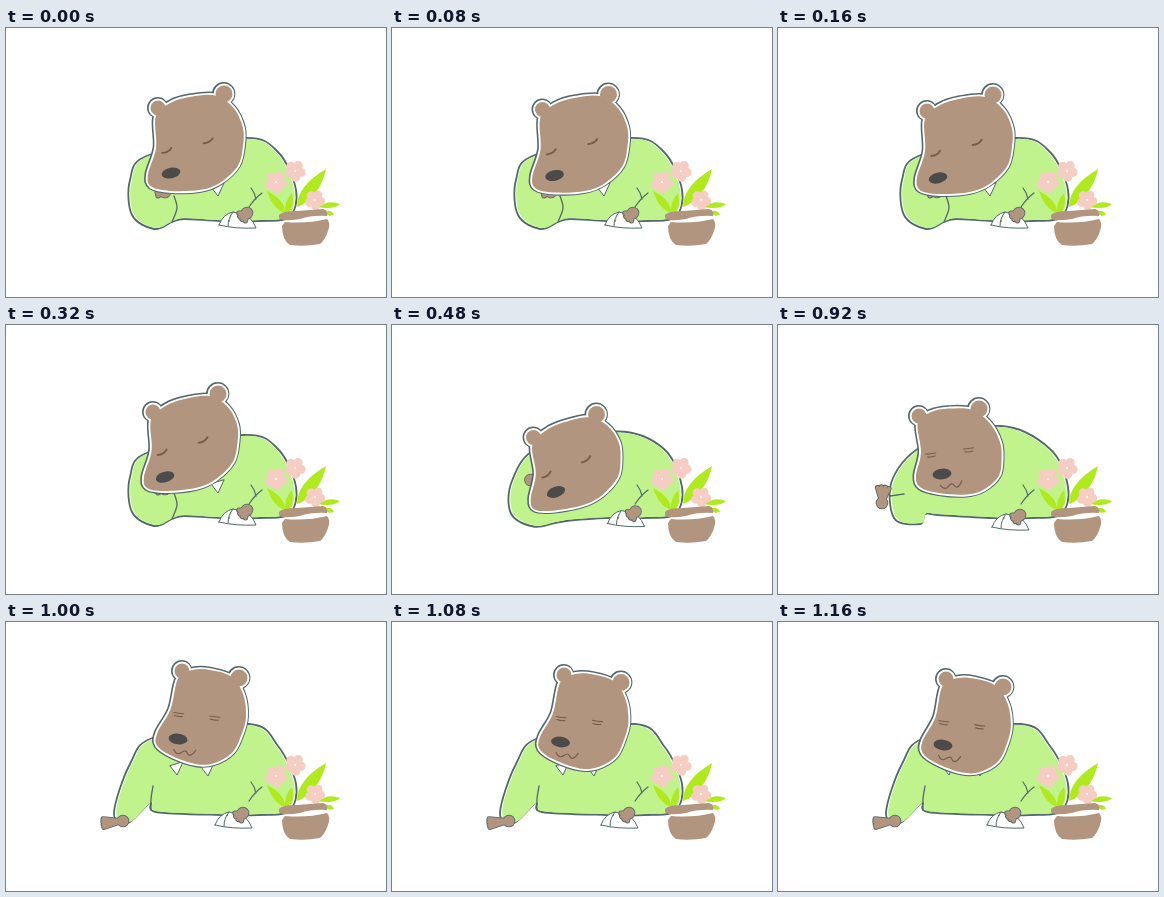
Write an HTML page that moves like this. It is 380 px wide and 269 px high and loops after 1.96 s.

```html
<!DOCTYPE html>
<html lang="en">
<head>
<meta charset="utf-8">
<title>Dozing bear</title>
<style>
  html, body { margin: 0; width: 100%; height: 100%; overflow: hidden; background: #fff; }
  svg { display: block; width: 100vw; height: 100vh; }
  path { stroke-linecap: round; stroke-linejoin: round; }
</style>
</head>
<body>
<svg id="stage" viewBox="0 0 380 269"></svg>
<script>
const INK = '#52686a', BROWN = '#b2957e', GREEN = '#c0f38c', PINK = '#f6cdc2',
      LEAF = '#aeea1c', FACE = '#795d4c', NOSE = '#4c4b4a';
const LOOP = 1960;
const stage = document.getElementById('stage');

const nums = text => text.split(' ').map(Number);
const pairs = list => list.flatMap((v, i) => i % 2 ? [] : [[v, list[i + 1]]]);

// The back and seat stay put; only the left arm and the neck move.
const BACK = nums('272 124 290 162 283 189 252 193 215 193');

// arm: outline from the seat round the left arm to the neck.
// left: palm x, y, direction, finger length, spread between fingers.
const asleep = {
  arm: nums('178 191 166 194 148 201 126 187 124 152 143 127 238 110'),
  fold: nums('168 168 171 180 166 194'), left: [159, 164, 185, 8, 22],
  right: [241, 185], collar: [[212, 168]]
};
const fallen = {
  arm: nums('178 200 160 202 135 202 112 190 116 160 150 118 215 103'),
  fold: nums('137 130 157 113 182 104'), left: [118, 146, -122, 19, 22],
  right: [246, 188], collar: [], squint: true, wand: true
};
const waking = {
  arm: nums('160 190 147 189 142 199 116 193 115 153 150 118 223 101'),
  fold: nums('112 171 119 170 126 169'), left: [104, 178, -85, 16, 14],
  right: [242, 190], collar: [], squint: true, mouth: true
};
const upright = {
  arm: nums('150 190 144 181 122 201 108 191 124 142 149 115 243 102'),
  fold: nums('147 164 145 177 145 188'), left: [117, 199, 174, 20, 8],
  right: [237, 191], collar: [[171, 153], [202, 154]], squint: true, mouth: true
};

// The head hangs on its two ears and the chin.
const pose = (body, earL, earR, chin, nose) => ({ body, earL, earR, chin, nose });
const poses = [
  pose(asleep, [152, 80], [218, 66], [165, 163], [165, 145]),
  pose(asleep, [149, 83], [215, 67], [162, 166], [160, 150]),
  pose(asleep, [147, 87], [212, 69], [161, 166], [159, 152]),
  pose(fallen, [136, 138], [197, 110], [165, 205], [169, 182]),
  pose(waking, [141, 91], [201, 84], [161, 168], [164, 149]),
  pose(upright, [176, 49], [233, 56], [166, 134], [172, 117]),
  pose(upright, [168, 57], [225, 65], [160, 142], [165, 123])
];

// Head outline: along the ears (0 to 1) and down to the chin (0 to 1).
const SKULL = pairs(nums('-.05 .09 .2 -.03 .51 -.05 .88 0 1.11 .19 1.2 .44 1.16 .65 ' +
  '1.04 .87 .75 1.02 .44 1.06 0 1 -.28 .9 -.3 .75 -.12 .46'));
const EYES = [[.03, .51], [.66, .5]];

// Start time and place in the pose sequence; halves are blends.
const steps = [[0, 0], [80, .5], [160, 1], [240, 1.5], [320, 2], [480, 2.5],
               [560, 3], [920, 4], [1000, 5], [1080, 5.5], [1160, 6]];

function mix(a, b, t) {
  if (typeof a === 'number') return a + (b - a) * t;
  if (Array.isArray(a)) return a.length === b.length ? a.map((v, i) => mix(v, b[i], t)) : a;
  if (typeof a === 'object')
    return Object.fromEntries(Object.keys(a).map(key => [key, mix(a[key], b[key], t)]));
  return a;
}

// Smooth curve through all points.
function curve(pts, closed) {
  const n = pts.length;
  const at = i => closed ? pts[(i + n) % n] : pts[Math.max(0, Math.min(n - 1, i))];
  let d = 'M' + pts[0];
  for (let i = 0; i < (closed ? n : n - 1); i++) {
    const [p, a, b, q] = [at(i - 1), at(i), at(i + 1), at(i + 2)];
    const c1 = a.map((v, k) => v + (b[k] - p[k]) / 6);
    const c2 = b.map((v, k) => v - (q[k] - a[k]) / 6);
    d += `C${c1} ${c2} ${b}`;
  }
  return d + (closed ? 'Z' : '');
}

const polar = (x, y, degrees, r) =>
  [x + r * Math.cos(degrees * Math.PI / 180), y + r * Math.sin(degrees * Math.PI / 180)];
const circle = ([x, y], r) => `M${x - r} ${y}a${r} ${r} 0 1 1 ${2 * r} 0a${r} ${r} 0 1 1 ${-2 * r} 0Z`;
const path = (d, fill, stroke = 'none', width = 0, extra = '') =>
  `<path d="${d}" fill="${fill}" stroke="${stroke}" stroke-width="${width}" ${extra}/>`;
const line = (d, color, width) => path(d, 'none', color, width);

function paw(x, y, direction, length, spread) {
  const palm = circle([x, y], 5.5);
  const fingers = [-1.5, -.5, .5, 1.5].map(k =>
    `M${x} ${y}L${polar(x, y, direction + k * spread, length)}`).join('');
  return line(fingers, INK, 5.4) + path(palm, BROWN, INK, 1.6) +
    line(fingers, BROWN, 3.6) + path(palm, BROWN);
}

function sheet([x, y]) {
  const at = `transform="translate(${x - 28} ${y + 12})"`;
  return path('M0 0Q4 -11 14 -13L29 -9Q35 -3 37 3Q16 4 0 0Z M14 -13Q9 -7 9 1', '#fff', INK, 1, at);
}

function wand() {
  const star = Array.from({ length: 10 }, (_, i) => polar(57, 134, i * 36 - 98, i % 2 ? 5.5 : 11));
  return path(`M${star.join('L')}Z`, '#f6f48e', '#eef0a0', 2) + line('M67 152L74 161', '#b5dcb0', 1.5);
}

function flower(x, y, size) {
  let d = circle([x, y], size * .7);
  for (let i = 0; i < 5; i++) d += circle(polar(x, y, i * 72 - 60, size * 1.35), size);
  return path(d, PINK) + path(circle([x, y], 1.2), '#fff3e8');
}

const plant =
  path('M291 179Q291 158 320 141Q315 165 296 177Z M261 163Q267 181 279 185Q279 172 261 163Z' +
       'M279 186Q278 173 286 165Q289 178 283 185Z M311 180Q322 171 334 176Q328 182 311 179Z', LEAF) +
  flower(270, 154, 4.8) + flower(289, 143, 4.6) + flower(309, 172, 4.4) +
  path('M273 187Q276 183 291 183L317 181Q324 183 321 188Q306 187 294 191Q276 194 273 190Z' +
       'M279 194Q301 196 321 191Q325 195 322 203Q319 212 314 216Q298 219 284 217Q276 212 276 198Z', BROWN) +
  path('M320 183Q326 182 328 187L323 188Z', LEAF);

function torso({ arm, fold, collar }) {
  const outline = curve(pairs([...arm, ...BACK]), true);
  return path(outline, '#fff', INK, 1.8) +
    path(outline, GREEN, 'none', 0, 'transform="translate(205 155) scale(.978) translate(-205 -155)"') +
    line(curve(pairs(fold)), INK, 1.3) +
    line('M245 160Q249 165 250 171M256 165Q249 170 243 179', INK, 1.2) +
    collar.map(([x, y]) => path(`M${x - 7} ${y - 9}L${x} ${y}L${x + 6} ${y - 13}Z`, '#fff', INK, 1)).join('');
}

function head({ earL, earR, chin, nose, body }) {
  const place = ([a, b]) => earL.map((v, k) => v + a * (earR[k] - v) + b * (chin[k] - v));
  const tilt = Math.atan2(earR[1] - earL[1], earR[0] - earL[0]) * 180 / Math.PI;
  const parts = [curve(SKULL.map(place), true), circle(earL, 7.5), circle(earR, 8.5)];
  const layer = (color, width, extra) => parts.map(d => path(d, color, color, width, extra)).join('');
  const turned = ([x, y]) => `transform="translate(${x} ${y}) rotate(${tilt})"`;
  const lids = body.squint ? 'M-5 -1.5Q0 -1 5 -1.5M-4 1.5Q0 2.5 4 1.5' : 'M-5 2Q1 3 5 -1';
  return layer(INK, 6.4, 'transform="translate(-.3 -.2)"') + layer('#fff', 3.8) + layer(BROWN, 0) +
    EYES.map(eye => path(lids, 'none', FACE, body.squint ? 1.1 : 1.9, turned(place(eye)))).join('') +
    (body.mouth ? path('M-3 11Q1 17 5 13Q9 9 11 13Q14 18 19 9', 'none', FACE, 1.2, turned(nose)) : '') +
    `<ellipse rx="9.5" ry="5.3" fill="${NOSE}" ${turned(nose)}/>`;
}

function bear(p) {
  const { left, right, wand: thrown } = p.body;
  return torso(p.body) + paw(...left) + head(p) +
    sheet(right) + paw(...right, 140, 8, 26) + (thrown ? wand() : '');
}

let shown = -1;
function draw(time) {
  const place = steps.filter(([start]) => start <= time % LOOP).pop()[1];
  if (place === shown) return;
  shown = place;
  const i = Math.floor(place);
  stage.innerHTML = bear(mix(poses[i], poses[Math.ceil(place)], place - i)) + plant;
}

const start = performance.now();
function tick() {
  draw(performance.now() - start);
  requestAnimationFrame(tick);
}
tick();
</script>
</body>
</html>
```
